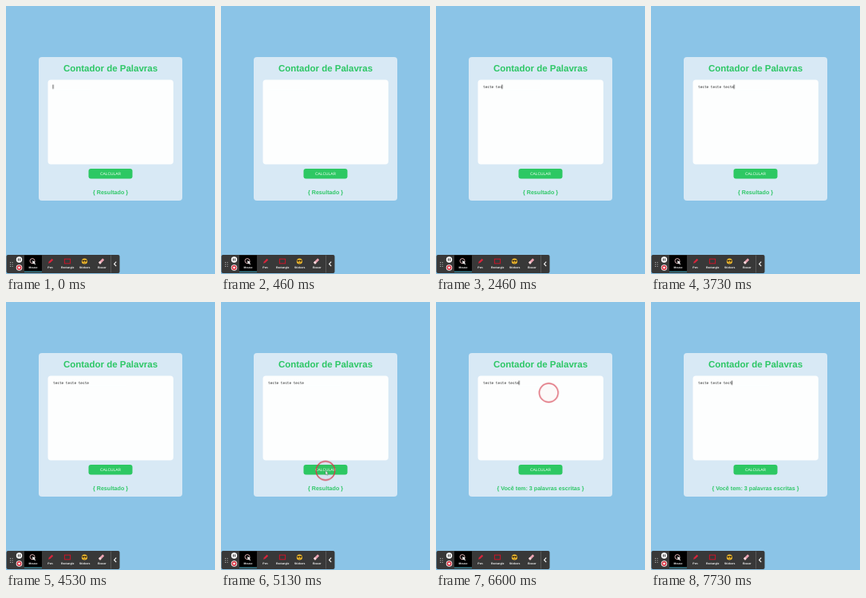
Write an HTML page that moves like this. It is 262x336 px and loops after 8000 ms.

```html
<!DOCTYPE html>
<html lang="pt">
<head>
<meta charset="utf-8">
<title>Contador de Palavras</title>
<style>
  html, body { margin: 0; width: 100%; height: 100%; overflow: hidden; background: #8bc4e7; }
  svg { display: block; width: 262px; height: 336px; }
  text {
    font-family: "Liberation Sans", Arial, sans-serif;
    text-anchor: middle;
    text-rendering: geometricPrecision;
  }
  .green { fill: #2dc766; font-weight: bold; }
  .typed { font: 4.4px "DejaVu Sans Mono", monospace; text-anchor: start; fill: #222; }
  .labels text { font-size: 3.45px; font-weight: bold; fill: #fff; }

  /* One loop is 8 s, so 1% is 80 ms. */
  .cover, .caret, .before, .after, .mouse, .ring, .arrow { animation: 8s step-end infinite; }
  .cover { animation-name: type; }
  .caret { animation-name: blink; }
  .before { animation-name: before; }
  .after { animation-name: after; }
  .mouse { animation-name: move; animation-timing-function: ease-in-out; }
  .ring { animation-name: press; animation-timing-function: linear; }
  .arrow { animation-name: point; }

  /* Inside the cover group one unit is one character. */
  @keyframes type {
    0% { transform: translateX(0); }
    13.2% { transform: translateX(1px); }
    14.87% { transform: translateX(2px); }
    16.6% { transform: translateX(3px); }
    18.2% { transform: translateX(4px); }
    20% { transform: translateX(5px); }
    26.6% { transform: translateX(6px); }
    27.4% { transform: translateX(7px); }
    28.2% { transform: translateX(8px); }
    30.68% { transform: translateX(9px); }
    31.6% { transform: translateX(10px); }
    33.2% { transform: translateX(11px); }
    36.6% { transform: translateX(12px); }
    39.1% { transform: translateX(13px); }
    40.7% { transform: translateX(14px); }
    42.5% { transform: translateX(15px); }
    45% { transform: translateX(16px); }
    46.56% { transform: translateX(17px); }
    96.56%, 100% { transform: translateX(16px); }
  }
  @keyframes blink {
    0%, 10%, 59.8%, 82.4%, 96.56%, 100% { opacity: 1; }
    3.3%, 53.2%, 63.2%, 90% { opacity: 0; }
  }
  @keyframes before {
    0% { opacity: 1; }
    65.8%, 100% { opacity: 0; }
  }
  @keyframes after {
    0% { opacity: 0; }
    65.8%, 100% { opacity: 1; }
  }
  @keyframes move {
    0%, 59.1% { transform: translate(127px, 172px); }
    62.4%, 73.2% { transform: translate(131px, 211.5px); }
    79.1%, 100% { transform: translate(141.3px, 113.7px); }
  }
  @keyframes press {
    0%, 63.19% { opacity: 0; }
    63.2%, 65.8% { opacity: .95; }
    69.1%, 82.39% { opacity: 0; }
    82.4%, 83.2% { opacity: .82; }
    85%, 100% { opacity: 0; }
  }
  @keyframes point {
    0%, 75%, 100% { opacity: 0; }
    61.2% { opacity: 1; }
  }
</style>
</head>
<body>
<svg viewBox="0 0 262 336">
  <rect width="262" height="336" fill="#8bc4e7"/>

  <rect x="41" y="64" width="180" height="180" rx="4" fill="#d8e9f5"/>
  <text class="green" x="131" y="82" font-size="11.5">Contador de Palavras</text>

  <rect x="52.5" y="92.5" width="157.3" height="106" rx="4" fill="#fdfefe"/>
  <text class="typed" x="59" y="103">teste teste teste</text>
  <g transform="translate(59 98.6) scale(2.65)">
    <g class="cover">
      <rect width="18" height="2.4" fill="#fdfefe"/>
      <rect class="caret" x="-.1" width=".3" height="2" fill="#222"/>
    </g>
  </g>

  <rect x="103.5" y="204" width="55" height="12.5" rx="3" fill="#2dc863"/>
  <text x="131" y="212" font-size="4.9" fill="#f4fff7">CALCULAR</text>

  <g class="green" font-size="7.15">
    <text class="before" x="131" y="235.5">{ Resultado }</text>
    <text class="after" x="131" y="235.5">{ Você tem: 3 palavras escritas }</text>
  </g>

  <!-- recorder toolbar -->
  <rect x=".5" y="312" width="142" height="23" rx="2" fill="#383838"/>
  <path d="M5.5 321v6.5M8 321v6.5" stroke="#bbb" stroke-width="1" stroke-dasharray="1 1.5"/>
  <circle cx="16.5" cy="318" r="3.7" fill="#fff"/>
  <path d="M15.4 316.4v3.2M17.6 316.4v3.2" stroke="#222" stroke-width="1"/>
  <circle cx="16.5" cy="328" r="3.8" fill="#fff"/>
  <circle cx="16.5" cy="328" r="3" fill="#d8303f"/>
  <rect x="15.3" y="326.8" width="2.4" height="2.4" fill="#fff"/>

  <rect x="23" y="312.5" width="22" height="21" fill="#000"/>
  <rect x="23" y="332.6" width="22" height="1" fill="#4fb3c8"/>
  <circle cx="33" cy="319.6" r="3" fill="none" stroke="#e9b9bb" stroke-width=".9"/>
  <path d="M33 319.3l4.2 1.8-1.7.7 1.6 1.7-.8.7-1.6-1.7-.8 1.5z" fill="#fff"/>

  <path d="M53 322.8l.8-2.4 3.8-3.6 1.6 1.6-3.8 3.6z" fill="#d5253b"/>
  <rect x="73.4" y="317.2" width="7.2" height="5.6" fill="none" stroke="#c91528" stroke-width="1"/>
  <circle cx="98.4" cy="320" r="3.6" fill="#f6c02f"/>
  <path d="M95.2 318.6h6.4l-.6 1.9h-1.9l-.7-1.2-.7 1.2h-1.9z" fill="#3b2a16"/>
  <path d="M96.8 321.6q1.6 1.3 3.2 0" fill="none" stroke="#7a4a12" stroke-width=".6"/>
  <g transform="rotate(-45 119.6 320)">
    <rect x="115.8" y="318.5" width="7.6" height="3" rx=".7" fill="#e8a0ae"/>
    <rect x="115.8" y="318.5" width="2.5" height="3" rx=".7" fill="#f5dadd"/>
  </g>
  <g class="labels">
    <text x="34" y="329.2">Mouse</text>
    <text x="55.5" y="329.2">Pen</text>
    <text x="77.2" y="329.2">Rectangle</text>
    <text x="98.7" y="329.2">Stickers</text>
    <text x="120.3" y="329.2">Eraser</text>
  </g>
  <path d="M131.5 312.5v22" stroke="#686868" stroke-width=".7"/>
  <path d="M138.2 320.6l-2.6 2.8 2.6 2.8" fill="none" stroke="#fff" stroke-width="1.1"/>

  <g class="mouse">
    <circle class="ring" r="11.8" fill="#d93a4a" fill-opacity=".03" stroke="#d5394a" stroke-width="1.4"/>
    <path class="arrow" d="M0 0v5l1.2-1 .8 1.7 1-.5-.8-1.6h1.5z" fill="#fff" stroke="#444" stroke-width=".4"/>
  </g>
</svg>
</body>
</html>
```
